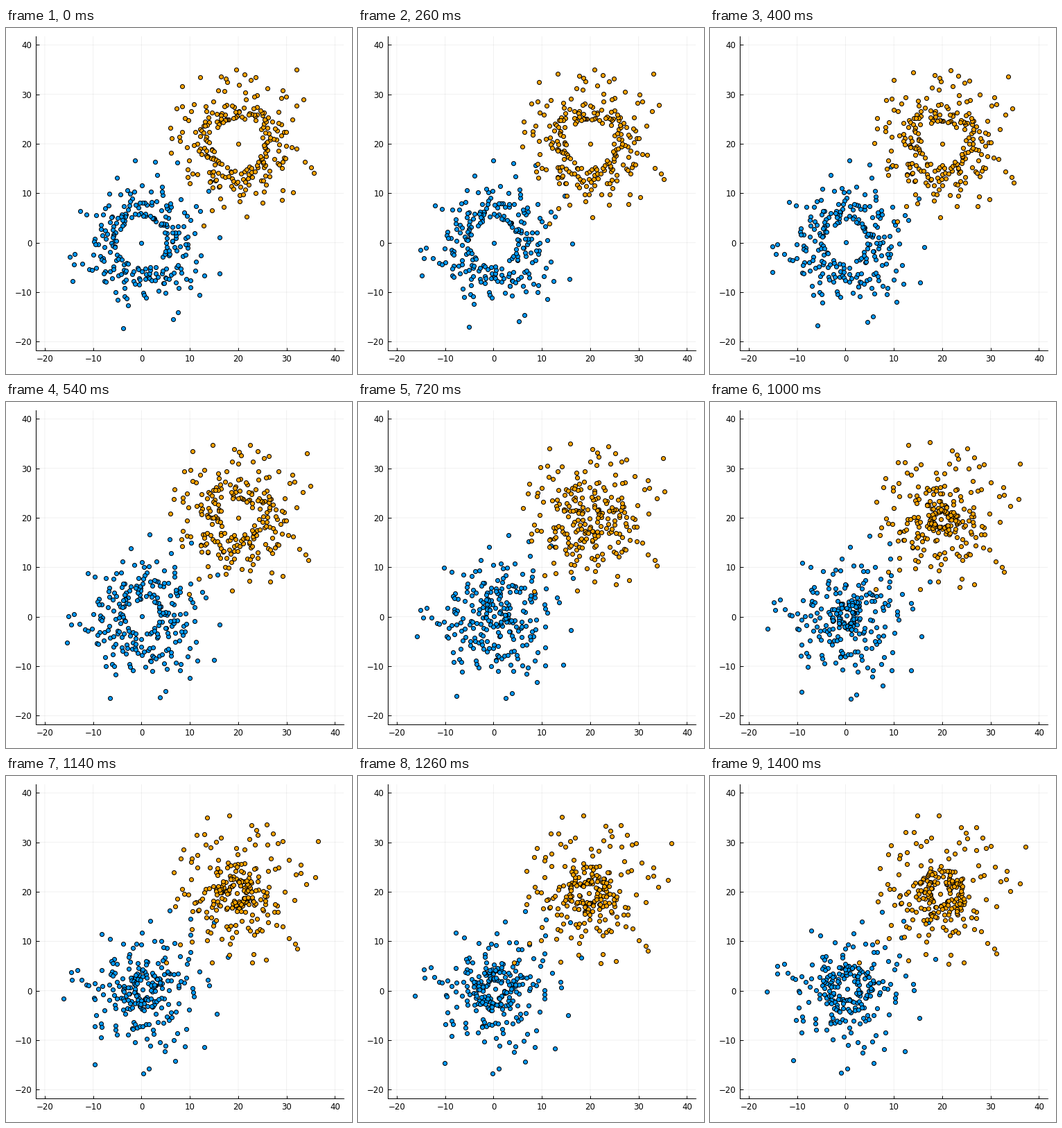
These frames come from a looping animation (499 by 499 pixels, 1420 ms). A matplotlib script:

```python
import numpy as np
import matplotlib.pyplot as plt
from matplotlib.animation import FuncAnimation

SIZE, DPI = 499, 64
PX = 72 / DPI                 # points per pixel
TICKS, STEPS, SUB = 71, 31, 20
GM, SPEED = 1.0, 0.26         # per simulation step
HOLE, SPREAD, EDGE = 5.1, 4.5, 14.8
STARS = 228                   # in each disc
CORES = np.array([[0.0, 0.0], [20.0, 20.0]])
COLORS = ["#009afa", "#ffa500"]

# The few stars beyond each disc's edge.
STRAYS = [
    [(-14.9, -2.8), (-14.3, -7.8), (-1.4, 16.6), (2.8, 16.3), (7.4, 16.2),
     (13.9, 10.5), (16.2, 1.1), (16.2, -6.2), (12, -10.5), (7.6, -14),
     (6.5, -15.4), (-3.8, -17.3)],
    [(6.2, 21.1), (7.2, 27.1), (8.4, 31.6), (12.1, 33.5), (19.6, 35),
     (32.1, 35), (33.5, 29), (35.1, 15.2), (35.7, 14.1), (31.3, 10.2),
     (21.7, 5.3), (12.8, 3.4)],
]


def disc(rng, core):
    """Half-normal falloff around an empty hole, spread evenly in angle."""
    r = HOLE + np.abs(rng.normal(0, SPREAD, STARS * 2))
    r = r[r < EDGE][:STARS]
    a = (np.arange(STARS) + rng.uniform(-1, 1, STARS)) * 2 * np.pi / STARS
    return core + np.column_stack([r * np.cos(a), r * np.sin(a)])


def pull(pos, core):
    d = core - pos
    return GM * d / ((d ** 2).sum(axis=1, keepdims=True) + 0.01) ** 1.5


def simulate(groups):
    """Leapfrog: massless stars around two mutually attracting cores."""
    rel = np.vstack([g - c for g, c in zip(groups, CORES)])
    clockwise = np.column_stack([rel[:, 1], -rel[:, 0]])
    spin = SPEED * clockwise / np.hypot(*rel.T)[:, None]
    pos = np.vstack([CORES, *groups])
    vel = np.vstack([np.zeros((2, 2)), spin])

    def accel(p):
        return pull(p, p[0]) + pull(p, p[1])

    dt = 1 / SUB
    track = [pos.copy()]
    acc = accel(pos)
    for _ in range(STEPS - 1):
        for _ in range(SUB):
            vel += acc * dt / 2
            pos += vel * dt
            acc = accel(pos)
            vel += acc * dt / 2
        track.append(pos.copy())
    return track


def step_at(tick):
    """Steps start at ticks 0, 1 and 6 of every seven."""
    cycle, k = divmod(tick, 7)
    return 3 * cycle + (k >= 1) + (k >= 6)


rng = np.random.default_rng(7)
groups = [np.vstack([strays, disc(rng, core)])
          for strays, core in zip(STRAYS, CORES)]
track = simulate(groups)
split = 2 + len(groups[0])

plt.rcParams["font.family"] = "DejaVu Sans"
fig = plt.figure(figsize=(SIZE / DPI, SIZE / DPI), dpi=DPI, facecolor="white")
ax = fig.add_axes([43.4 / SIZE, 33.8 / SIZE, 443.6 / SIZE, 453.7 / SIZE])
ax.set(xlim=(-21.8, 41.8), ylim=(-21.8, 41.8),
       xticks=range(-20, 41, 10), yticks=range(-20, 41, 10))
ax.set_axisbelow(True)
ax.grid(color="black", alpha=0.07, linewidth=0.8 * PX, snap=False)
ax.tick_params(direction="in", length=4.5 * PX, width=PX, pad=6 * PX,
               labelsize=11.8 * PX)
ax.spines[["top", "right"]].set_visible(False)
ax.spines[["left", "bottom"]].set_linewidth(PX)

dots = [ax.plot([], [], "o", ms=6 * PX, mfc=c, mec="black", mew=1.05 * PX,
                clip_on=False)[0] for c in COLORS]


def draw(tick):
    pos = track[step_at(tick)]
    dots[0].set_data(*np.vstack([pos[:1], pos[2:split]]).T)
    dots[1].set_data(*np.vstack([pos[1:2], pos[split:]]).T)
    return dots


anim = FuncAnimation(fig, draw, frames=TICKS, interval=20, repeat=True,
                     repeat_delay=0, init_func=lambda: draw(0))
plt.show()
```
